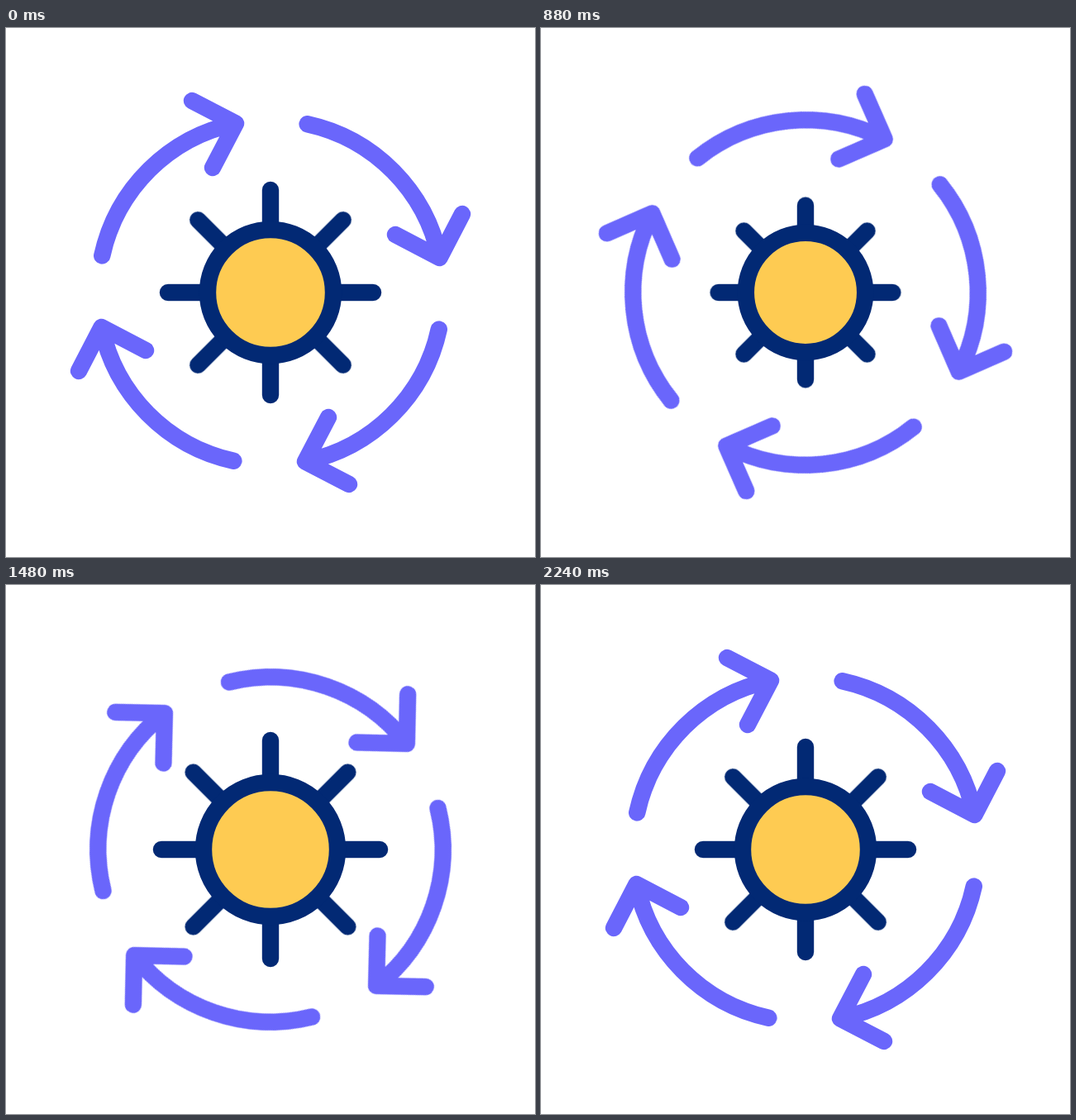
Animation, 640 px wide and 640 px high, one loop 2320 ms. Source, as an HTML page:

```html
<!DOCTYPE html>
<html lang="en">
<head>
<meta charset="utf-8">
<title>Sun cycle</title>
<style>
  html, body { margin: 0; width: 100%; height: 100%; overflow: hidden; background: #fff; }
  svg { display: block; width: 100vw; height: 100vh; }

  .arrows, .ray, .disc { animation: 2320ms linear infinite paused; }
  .arrows { animation-name: turn; }
  .ray { animation-name: reach; }
  .disc { animation-name: pulse; fill: #fecb52; }

  .line { fill: none; stroke-width: 20.4; stroke-linecap: round; stroke-linejoin: round; }
  .purple { stroke: #6a66fb; }
  .navy { stroke: #022974; }

  @keyframes turn {
    0% { transform: rotate(0deg); }
    17.2414% { transform: rotate(0deg); animation-timing-function: cubic-bezier(.53, 0, .47, 1); }
    96.5517%, 100% { transform: rotate(360deg); }
  }
  @keyframes pulse {
    0% { r: 76px; }
    1.7241% { r: 76px; animation-timing-function: cubic-bezier(.333, 0, .667, 1); }
    28.8793% { r: 66px; animation-timing-function: cubic-bezier(.333, 0, .667, 1); }
    53.4483% { r: 86px; animation-timing-function: cubic-bezier(.333, 0, .667, 1); }
    74.1379%, 100% { r: 76px; }
  }
  @keyframes reach {
    0% { transform: translateY(-124px); }
    1.7241% { transform: translateY(-124px); animation-timing-function: cubic-bezier(.333, 0, .667, 1); }
    28.8793% { transform: translateY(-90px); animation-timing-function: cubic-bezier(.333, 0, .667, 1); }
    53.4483% { transform: translateY(-140px); animation-timing-function: cubic-bezier(.333, 0, .667, 1); }
    74.1379%, 100% { transform: translateY(-124px); }
  }
</style>
</head>
<body>
<svg viewBox="0 0 640 640">
  <defs>
    <path id="arrow" d="M44.6-203.8A208.6 208.6 0 0 1 204.5-42M232-95L204.5-42L151-70"/>
  </defs>
  <g transform="translate(320 320)">
    <g class="arrows line purple">
      <use href="#arrow"/>
      <use href="#arrow" transform="rotate(90)"/>
      <use href="#arrow" transform="rotate(180)"/>
      <use href="#arrow" transform="rotate(270)"/>
    </g>
    <g id="rays" class="line navy"></g>
    <circle class="disc navy" r="76" stroke-width="20.4"/>
  </g>
</svg>
<script>
  const LOOP = 2320, STEP = 40;

  // Each ray slides outward from beneath the disc.
  document.getElementById('rays').innerHTML = Array.from({ length: 8 }, (_, i) =>
    `<g transform="rotate(${i * 45})"><path class="ray" d="M0 0V64"/></g>`).join('');

  const animations = document.getAnimations();

  // Advance the eased keyframes in steps of 25 per second.
  function tick() {
    const time = Math.floor(performance.now() % LOOP / STEP) * STEP;
    for (const a of animations) a.currentTime = time;
    requestAnimationFrame(tick);
  }
  tick();
</script>
</body>
</html>
```
